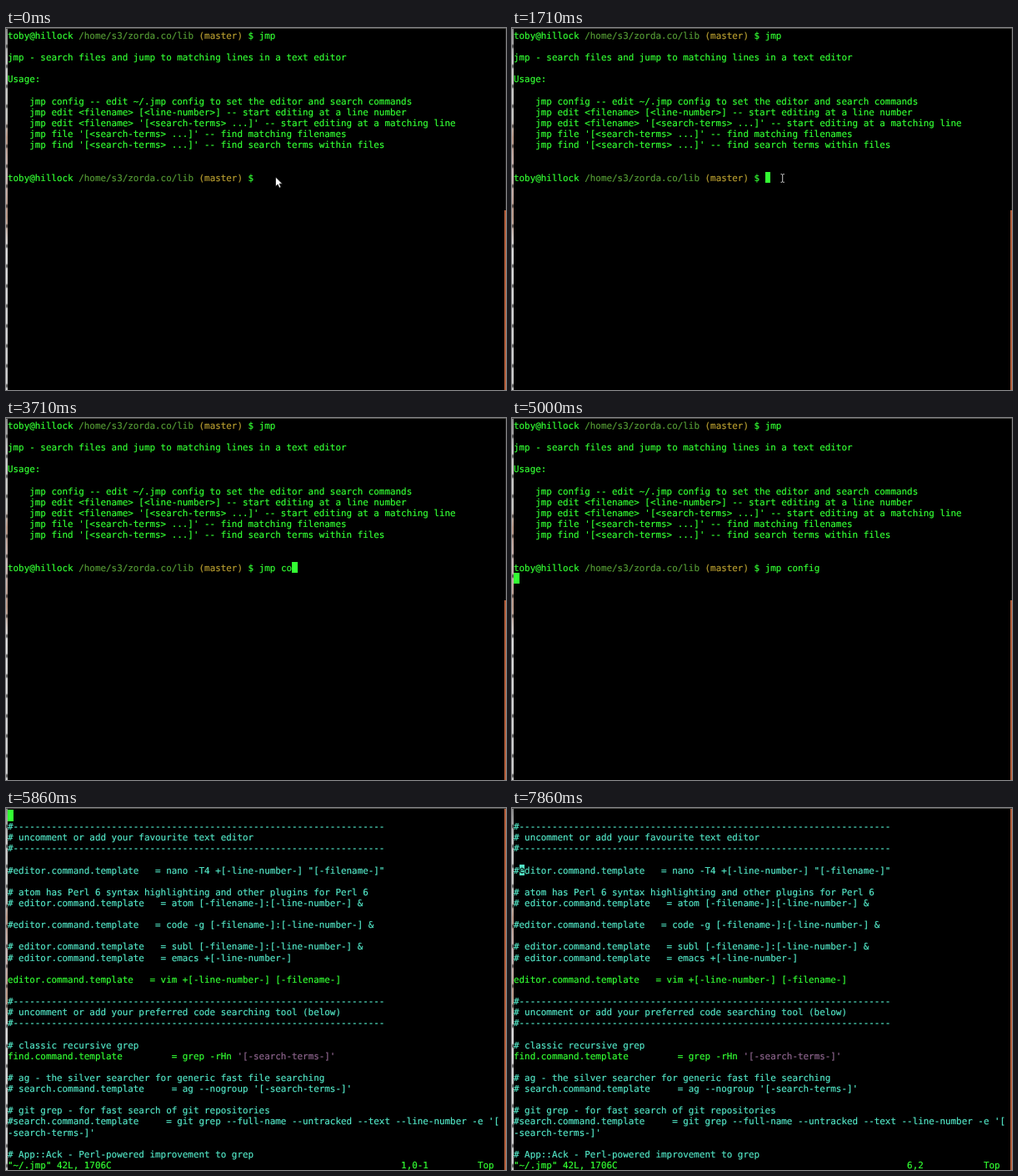
An HTML page that plays this animation: 600 px wide and 435 px high, repeating every 8000 ms.

```html
<!DOCTYPE html>
<html lang="en">
<head>
<meta charset="utf-8">
<title>Terminal</title>
<style>
  html, body { margin: 0; width: 100%; height: 100%; overflow: hidden; background: #000; }
  #stage { position: relative; width: 600px; height: 435px; overflow: hidden; background: #000; }
  #stage > * { position: absolute; }
  pre {
    margin: 0; left: 2px; top: 2.9px; color: #33ff33;
    font: 10.9px/13.125px "DejaVu Sans Mono", monospace;
    text-rendering: geometricPrecision; font-variant-ligatures: none;
    -webkit-text-stroke: .2px;
  }
  #cursor { width: 6.56px; height: 13.125px; color: #000; }
  .path { color: #559a35; }
  .branch { color: #b79d30; }
  .note { color: #52e6c6; }
  .quote { color: #8c648c; }
  #top { left: 0; top: 0; width: 600px; height: 1px; background: #484846; }
  #left {
    left: 0; top: 1px; width: 2px; height: 434px;
    background:
      repeating-linear-gradient(#0000 0 18px, #0008 20px 22px, #0000 24px),
      linear-gradient(#888, #ccc 9%, #c8c8c4 25%, #b98 30%, #cbb 40%, #b98 52%, #ddd 60%, #ccc);
  }
  #bar { right: 0; bottom: 0; width: 2px; background: #b5603c; }
  #track { right: 0; top: 1px; width: 1px; height: 434px; background: #1c1b1a; }
</style>
</head>
<body>
<div id="stage">
  <pre id="screen"></pre>
  <pre id="cursor"></pre>
  <div id="top"></div>
  <div id="left"></div>
  <div id="track"></div>
  <div id="bar"></div>
  <svg width="600" height="435">
    <path id="arrow" d="M323.5 179v11.4l2.6-2.4 1.9 4.2 2-.9-1.9-4.1h3.6z" fill="#fff" stroke="#000" stroke-width=".7"/>
    <path id="beam" d="M322.5 175.7h1.5l.7.6.7-.6h1.5M324.7 176v9M322.5 185.3h1.5l.7-.6.7.6h1.5" fill="none" stroke="#ccc"/>
  </svg>
</div>
<script>
const LOOP = 8000, CELL = 6.5625, ROW = 13.125, EDITOR_START = 5140;
const $ = id => document.getElementById(id);
const escape = s => s.replace(/&/g, '&amp;').replace(/</g, '&lt;');
const span = (name, s) => `<span class="${name}">${escape(s)}</span>`;

const prompt = 'toby@hillock ' + span('path', '/home/s3/zorda.co/lib') + ' ' +
  span('branch', '(master)') + ' $ ';
const promptWidth = 46;

const usage = escape(`
jmp - search files and jump to matching lines in a text editor

Usage:

    jmp config -- edit ~/.jmp config to set the editor and search commands
    jmp edit <filename> [<line-number>] -- start editing at a line number
    jmp edit <filename> '[<search-terms> ...]' -- start editing at a matching line
    jmp file '[<search-terms> ...]' -- find matching filenames
    jmp find '[<search-terms> ...]' -- find search terms within files


`);

const rule = '#' + '-'.repeat(68);
const config = `
${rule}
# uncomment or add your favourite text editor
${rule}

#editor.command.template   = nano -T4 +[-line-number-] "[-filename-]"

# atom has Perl 6 syntax highlighting and other plugins for Perl 6
# editor.command.template   = atom [-filename-]:[-line-number-] &

#editor.command.template   = code -g [-filename-]:[-line-number-] &

# editor.command.template   = subl [-filename-]:[-line-number-] &
# editor.command.template   = emacs +[-line-number-]

editor.command.template   = vim +[-line-number-] [-filename-]

${rule}
# uncomment or add your preferred code searching tool (below)
${rule}

# classic recursive grep
find.command.template         = grep -rHn '[-search-terms-]'

# ag - the silver searcher for generic fast file searching
# search.command.template     = ag --nogroup '[-search-terms-]'

# git grep - for fast search of git repositories
#search.command.template     = git grep --full-name --untracked --text --line-number -e '[
-search-terms-]'

# App::Ack - Perl-powered improvement to grep`.split('\n');

const highlight = line =>
  /^[#-]/.test(line) ? span('note', line) :
  escape(line).replace(/'.*'/, s => span('quote', s));
const configHtml = config.map(highlight).join('\n');

// [start time, typed command]
const typing = [[0, ''], [2000, 'j'], [2290, 'jm'], [2570, 'jmp'], [3000, 'jmp '],
  [3430, 'jmp c'], [3710, 'jmp co'], [4000, 'jmp confi'], [4290, 'jmp config']];
// [start time, row, column]
const moves = [[EDITOR_START, 0, 0], [6140, 1, 0], [6430, 2, 0], [6860, 4, 0],
  [7140, 5, 0], [7860, 5, 1]];
const latest = (list, t) => list.filter(step => step[0] <= t).pop();

function show(id, visible) {
  $(id).style.display = visible ? '' : 'none';
}

function setScreen(html) {
  if (setScreen.last !== html) $('screen').innerHTML = setScreen.last = html;
}

function placeCursor(row, col, char = '', color = '#33ff33') {
  const c = $('cursor');
  c.style.left = 2 + col * CELL + 'px';
  c.style.top = 2.4 + row * ROW + 'px';
  c.style.background = color;
  c.textContent = char;
}

function drawShell(t) {
  const typed = latest(typing, t)[1], entered = t >= 5000;
  setScreen(prompt + 'jmp\n' + usage + prompt + typed);
  placeCursor(entered ? 14 : 13, entered ? 0 : promptWidth + typed.length);
}

function drawEditor(t) {
  const [, row, col] = latest(moves, t);
  const line = config[row];
  const ruler = `${row + 1},${line ? col + 1 : '0-1'}`;
  const status = '"~/.jmp" 42L, 1706C'.padEnd(72) + ruler.padEnd(14) + 'Top';
  setScreen(configHtml + '\n' + status);
  placeCursor(row, col, line[col], line ? '#52e6c6' : undefined);
}

const start = performance.now();

function frame() {
  const t = (performance.now() - start) % LOOP, editing = t >= EDITOR_START;
  (editing ? drawEditor : drawShell)(t);
  show('cursor', t >= 1710);
  show('arrow', t < 860);
  show('beam', t >= 860 && t < 2000);
  $('bar').style.height = (editing ? 434 : 216) + 'px';
  requestAnimationFrame(frame);
}
frame();
</script>
</body>
</html>
```
